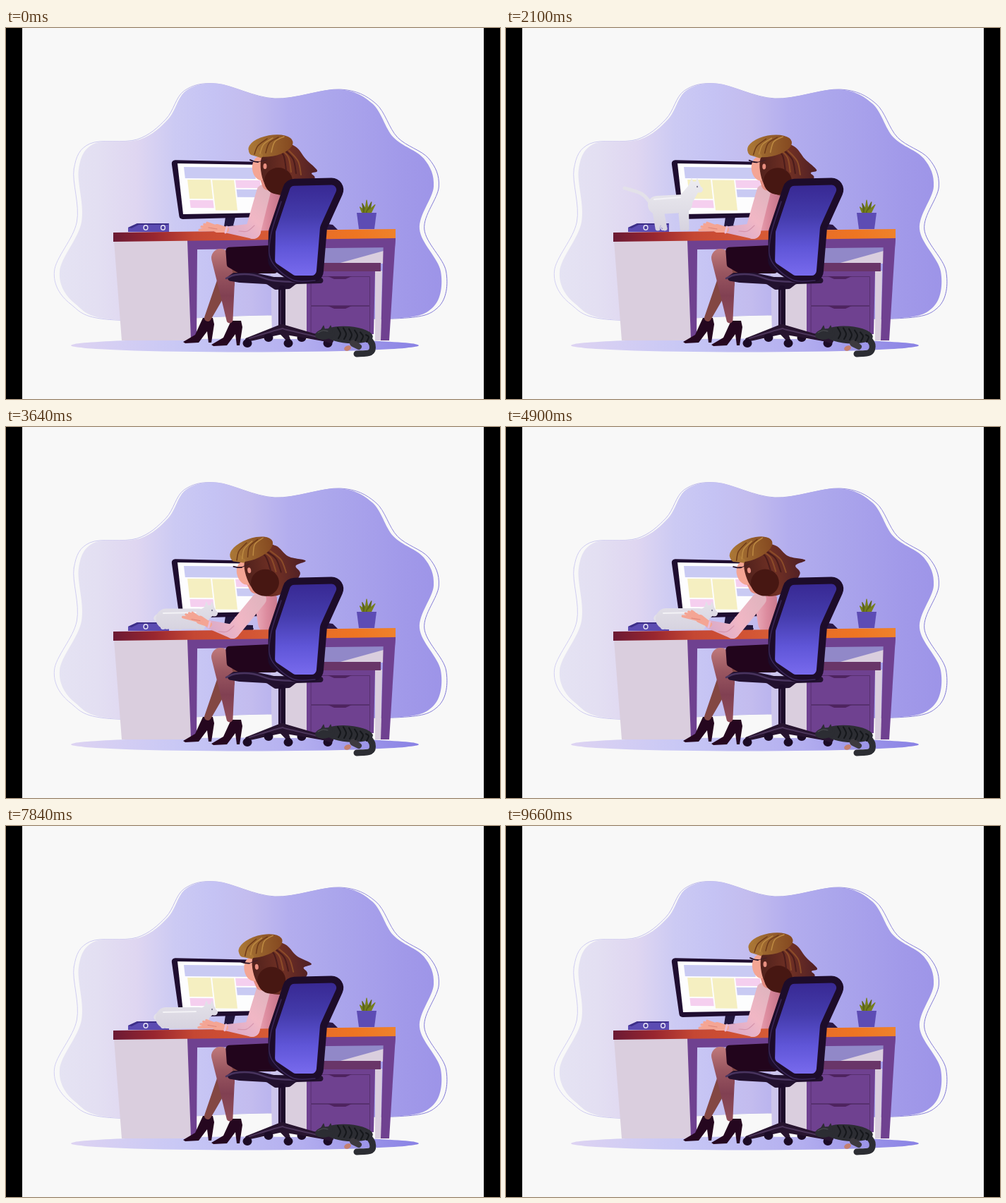
An HTML page with a canvas that plays this animation: 700x526 px, repeating every 9.8 s.

```html
<!DOCTYPE html>
<html lang="en">
<head>
<meta charset="utf-8">
<title>Desk with cats</title>
<style>
html, body { margin: 0; width: 100%; height: 100%; overflow: hidden; background: #000; }
canvas { display: block; }
</style>
</head>
<body>
<canvas id="stage" width="700" height="526"></canvas>
<script>
const c = document.getElementById('stage').getContext('2d');
const LOOP = 9800, STEP = 140, PI = Math.PI, TAU = PI * 2;
const DARK = '#1d0c2a', PURPLE = '#6f4190', PALE = '#dacede';
const SKIN = '#f4a594', SHOE = '#25071f', FUR = '#2c2d33', NAVY = '#21163c';

const lerp = (a, b, k) => a + (b - a) * k;
const between = (p, q, k) => [lerp(p[0], q[0], k), lerp(p[1], q[1], k)];
const ramp = (t, a, b) => {
  const k = Math.min(1, Math.max(0, (t - a) / (b - a)));
  return k * k * (3 - 2 * k);
};
const wave = (t, period) => Math.sin(TAU * t / period);
const pts = s => s.split(' ').map(p => p.split(',').map(Number));

function paint(fill) {
  c.fillStyle = fill;
  c.fill();
}
function ink(col, w) {
  c.strokeStyle = col;
  c.lineWidth = w;
  c.lineCap = c.lineJoin = 'round';
  c.stroke();
}
// Evenly spaced colour stops
function grad(x0, y0, x1, y1, ...cols) {
  const g = c.createLinearGradient(x0, y0, x1, y1);
  cols.forEach((col, i) => g.addColorStop(i / (cols.length - 1), col));
  return g;
}
function poly(s, fill) {
  c.beginPath();
  pts(s).forEach(p => c.lineTo(...p));
  c.closePath();
  paint(fill);
}
// Polygon with rounded corners
function rounded(s, r) {
  const p = pts(s), n = p.length;
  c.beginPath();
  c.moveTo(...between(p[n - 1], p[0], .5));
  p.forEach((q, i) => c.arcTo(...q, ...p[(i + 1) % n], r));
  c.closePath();
}
// Smooth path through every point
function spline(p, closed) {
  const n = p.length;
  const at = i => p[closed ? (i + n) % n : Math.min(n - 1, Math.max(0, i))];
  c.beginPath();
  c.moveTo(...p[0]);
  for (let i = 0; i < (closed ? n : n - 1); i++) {
    const [a, b, d, e] = [at(i - 1), at(i), at(i + 1), at(i + 2)];
    c.bezierCurveTo(b[0] + (d[0] - a[0]) / 6, b[1] + (d[1] - a[1]) / 6,
      d[0] - (e[0] - b[0]) / 6, d[1] - (e[1] - b[1]) / 6, ...d);
  }
}
function line(p, col, w) {
  spline(p, false);
  ink(col, w);
}
function oval(x, y, rx, ry, fill, turn = 0) {
  c.beginPath();
  c.ellipse(x, y, rx, ry, turn, 0, TAU);
  paint(fill);
}
// Tapered limb with round ends of radius r and s
function limb([x, y], [u, v], r, s, fill) {
  const a = Math.atan2(v - y, u - x) + PI / 2;
  c.beginPath();
  c.arc(x, y, r, a, a + PI);
  c.arc(u, v, s, a + PI, a + TAU);
  c.closePath();
  paint(fill);
}

const CLOUD = pts('103,200 125,164 190,158 230,129 255,89 300,79 380,100 470,87 519,107 549,155 592,185 606,225 586,285 616,345 605,396 545,412 370,407 160,414 98,391 76,345 107,275');

function backdrop() {
  c.fillStyle = '#000';
  c.fillRect(0, 0, 700, 526);
  c.fillStyle = '#f8f8f8';
  c.fillRect(23, 0, 654, 526);
  const cx = 345;
  spline(CLOUD.map(([x, y]) => [cx + (x - cx) * 1.028, y]), true);
  ink(grad(68, 0, 622, 0, '#d2cff2', '#b5b0e6', '#8078d6'), 1);
  spline(CLOUD, true);
  paint(grad(76, 0, 618, 0, '#e5e3f3', '#e3dff2', '#dfd6f1', '#cccaf3', '#c5c3f4', '#c3bcee', '#b3adee', '#aca7ec', '#a7a0eb', '#a199e9', '#9d94e8'));
  oval(338.5, 450, 246.5, 9.5, grad(92, 0, 585, 0, '#ddd3f2', '#c7c7f5', '#b3aeef', '#8981e4'));
}

function drawers() {
  poly('375,312 426,312 426,433 377,433', PALE);
  poly('375,312 396,312 396,433 377,433', '#ccc5ec');
  poly('448,310 536,310 536,334 448,334', '#9188c8');
  poly('470,334 535,316 535,334', PALE);
  poly('523,344 533,344 531,443 523,443', PALE);
  poly('426,344 523,344 521,434 426,434', PURPLE);
  poly('420,333 531,333 531,345 420,345', '#693568');
  for (const y of [352, 394]) {
    c.strokeStyle = '#57306f';
    c.lineWidth = 1;
    c.strokeRect(432.5, y + .5, 83, 41);
    poly(`456,${y} 490,${y} 481,${y + 4} 465,${y + 4}`, '#4e235f');
  }
  poly('535,300 552,298 543,443 531,443', PURPLE);
}

function monitor() {
  poly('311,268 325,268 322,280 350,281 350,288 308,288', NAVY);
  rounded('234,187 368,190 368,268 246,271', 5);
  paint('#1f0d30');
  poly('243,192 364,194 364,262 251,264', '#fdfdfe');
  c.save();
  c.transform(1, .01, .115, 1, 252, 197);
  const panel = (x, y, w, h, col) => {
    c.fillStyle = col;
    c.fillRect(x, y, w, h);
  };
  panel(0, 0, 100, 16, '#c9caf3');
  panel(3, 18, 33, 27, '#f5efc1');
  panel(38, 18, 31, 43, '#f5efc1');
  panel(3, 47, 33, 11, '#f5cfef');
  panel(71, 18, 35, 11, '#f5cfef');
  panel(71, 31, 35, 11, '#c9caf3');
  c.restore();
}

function binder() {
  poly('173,283 186,277 231,277 231,289 173,289', '#5b4bb2');
  poly('173,283 186,277 231,277 229,279 188,279 178,284', '#3d2f88');
  for (const x of [198, 222.5]) {
    oval(x, 283, 3.6, 4, '#e6e3f4');
    oval(x, 283, 2.2, 2.6, '#4b3c9f');
  }
}

function plant() {
  for (let i = -2; i <= 2; i++) {
    const a = i * .33 - PI / 2, len = 17 - 3 * Math.abs(i) + i;
    limb([511 + i * 2, 261], [511 + i * 2 + Math.cos(a) * len, 261 + Math.sin(a) * len], 3.2, .6, i % 2 ? '#5d6519' : '#767f1d');
  }
  poly('497,262 525,262 522,285 500,285', '#5d4cb4');
}

function desk() {
  poly('153,302 258,301 262,443 164,443', PALE);
  poly('257,301 552,297 551,311 271,314 270,443 262,443', PURPLE);
  poly('152,290 552,285 552,298 152,303',
    grad(152, 0, 552, 0, '#6b1a34', '#98262f', '#c54733', '#cf5034', '#d85d35', '#e66c2a', '#ee7522', '#ef822b'));
  poly('452,286 456,278 463,279 470,286', '#2a1743');
  poly('336,281 349,281 351,287 334,287', NAVY);
  plant();
}

function torso(k) {
  const skin = grad(350, 0, 390, 0, '#eeb1be', '#dc8b9e', '#c27288');
  limb([lerp(377, 368, k), lerp(236, 244, k)], [371, 278], 16, 14, skin);
}

function head(k, sway) {
  c.save();
  c.translate(372 - 18 * k, 222 + 6 * k);
  c.rotate(-.17 * k - sway);
  c.translate(-372, -222);
  limb([366, 206], [371, 222], 8, 8, '#e58d80');
  oval(361, 199, 12, 17, SKIN, -.12);
  // The loose end swings out as the head comes forward
  const tip = [441 + 7 * k, 202 - 6 * k];
  spline([[362, 184], [385, 161], [410, 168], [425, 186], tip, [433, 206 - 5 * k], [437, 214], [415, 234], [388, 237], [366, 220]], true);
  paint(grad(365, 0, 440, 0, '#54231d', '#703024', '#512025'));
  oval(386, 217, 20, 19, '#471712');
  for (let i = 0; i < 4; i++) {
    const x = 380 + 7 * i;
    line([[x, 168 + 2 * i], [x + 13, 180 + 3 * i], [x + 17, 202 + 2 * i]], i % 2 ? '#8c4c29' : '#4a1c1b', 2);
  }
  oval(375, 167, 32, 15, grad(343, 0, 406, 0, '#ad7a36', '#96602c', '#854920'), -.18);
  limb([351, 174], [361, 181], 7, 3, '#a87435');
  for (let i = 0; i < 4; i++) {
    const x = 352 + 8 * i;
    line([[x, 179 - i], [x + 5, 167 - 2 * i], [x + 18, 157 - i]], i % 2 ? '#bd8a42' : '#6e3a19', 1.5);
  }
  line([[346, 187], [351, 189], [357, 190]], '#251126', 1.8);
  line([[357, 190], [369, 187]], '#41202a', 1);
  oval(367, 196, 2.5, 4, '#e88f80');
  c.restore();
}

function shoe(dx, dy) {
  c.save();
  c.translate(dx, dy);
  poly('279,411 293,411 295,420 291,446 287,446 285,430 273,446 254,447 251,445 268,435', SHOE);
  c.restore();
}

function legs() {
  const tights = grad(0, 313, 0, 413, '#c07a7c', '#995660', '#814052', '#8f4d59');
  shoe(0, 0);
  limb([316, 345], [286, 411], 12, 5, '#834743');
  shoe(40, 4);
  limb([304, 326], [312, 362], 13, 12, tights);
  limb([312, 362], [317, 414], 12, 4.5, tights);
  rounded('311,311 374,308 387,348 330,348 313,338', 5);
  paint('#22051c');
}

function arm(k, pat) {
  const shoulder = between([365, 232], [359, 244], k);
  const elbow = between([350, 288], [321, 290], k);
  const wrist = between([312, 286], [288, 280], k);
  const palm = [wrist[0] - 13, wrist[1] - lerp(2, 8, k) + pat * .4];
  const cloth = grad(...wrist, ...shoulder, '#dbabc9', '#f1b7c5', '#e2b4bf');
  limb(shoulder, elbow, 10, lerp(11, 10, k), cloth);
  limb(elbow, wrist, lerp(11, 10, k), lerp(4.5, 6, k), cloth);
  line([[elbow[0] + 2, elbow[1] - 8], [elbow[0] - 8, elbow[1]], [elbow[0] - 20, elbow[1]]], '#d595ad', 1.2);

  limb(wrist, palm, 4, 6, SKIN);
  for (let i = 0; i < 4; i++) {
    const a = PI - .1 + .2 * i + k * .25 + pat * .02, len = 25 - 3 * i;
    limb(palm, [palm[0] + Math.cos(a) * len, palm[1] + Math.sin(a) * len + pat * .4], 4, 1.7, SKIN);
  }
  line([[palm[0] - 12, palm[1] - 1], [palm[0], palm[1] + 1]], '#dc8278', 1);
  line([[wrist[0] + 1, wrist[1] - 4], [wrist[0] - 1, wrist[1] + 4]], '#e8bdd8', 3);
}

function chair() {
  rounded('308,357 322,347 352,347 380,353 450,354 449,362 411,363 402,370 381,371 369,363 331,361', 4);
  paint('#22112f');
  line([[312, 355], [325, 350], [350, 350], [378, 358], [410, 360]], '#49345f', 2.5);
  limb([391, 370], [391, 424], 5, 5, DARK);
  line([[389, 372], [389, 420]], '#432f55', 1.5);
  for (const x of [342, 372, 400, 419, 456]) {
    const y = 447 - 8 * (x === 372 || x === 419);
    limb([391, 427], [x, y - 5], 7, 3, '#27142f');
    oval(x, y, 6.5, 6, '#1b0b25');
  }
  limb([440, 437], [460, 443], 4, 4, '#27142f');
  line([[345, 440], [388, 427], [398, 428], [450, 440]], '#4b3459', 2);

  rounded('400,219 480,217 450,283 444,356 407,356 376,335 377,288', 12);
  paint(grad(0, 223, 0, 354, '#382993', '#443bab', '#5f55d7', '#7a6cef'));
  ink(DARK, 10);
  line([[390, 246], [375, 295], [376, 330], [406, 357], [438, 358]], '#3a2758', 1.5);
}

function whiteCat(lie, breath) {
  const fur = grad(0, 215, 0, 289, '#ecebf0', '#e2e0e8', '#d6d2df');
  const hip = between([214, 251], [227, 272], lie);
  const chest = between([251, 249], [273, 272], lie);
  const [hx, hy] = between([267, 226], [288, 261], lie);
  const r = lerp(13, 15, lie) + breath;
  line([between([204, 247], [218, 266], lie), between([192, 235], [212, 272], lie), between([168, 227], [228, 284], lie)], '#e3e1e9', 5);
  for (const [from, foot] of [[hip, 215], [hip, 225], [chest, 250], [chest, 256]]) {
    limb(from, [lerp(foot, foot + 22, lie), 284], 8, 3.5, fur);
  }
  limb(hip, chest, r, r, fur);
  limb(chest, [hx, hy], 11, 8, fur);
  oval(hx, hy, 9, 8.5, fur);
  oval(hx + 7, hy + 3, 5, 4.5, fur);
  for (const x of [hx - 4, hx + 4]) {
    limb([x, hy - 4], [x, hy - 13], 3.5, .5, fur);
  }
  line([[hip[0] - 4, hip[1] - 8], [chest[0] - 4, chest[1] - 9]], '#f3f2f6', 2);
  oval(hx + 4, hy - 1, 1, 1.2, '#77728b');
}

// Jump arc from behind the desk (u = 0) to its top (u = 1)
function placeCat(u, lie, breath) {
  c.save();
  c.translate(-22 * (1 - u), 120 * (1 - u) - 150 * Math.sin(PI * u) * u);
  whiteCat(lie, breath);
  c.restore();
}

function sleepingCat(t) {
  const wag = wave(t, 2450) * 1.2, rise = wave(t, 1960) * .5;
  line([[511, 437], [519, 449], [516 + wag, 460], [497, 462]], FUR, 9);
  oval(485, 435, 35, 12 + rise, FUR, .08);
  oval(452, 434, 14, 7.5, FUR, -.15);
  for (const x of [449, 459]) limb([x, 430], [x + 1, 422], 4, .5, FUR);
  oval(484, 454, 5, 3.5, '#c5806f', -.4);
  limb([492, 447], [500, 452], 5, 4, '#3d3a3f');
  for (let i = 0; i < 6; i++) {
    const x = 470 + i * 8;
    line([[x, 425 + i * i * .4], [x + 4, 433 + i], [x + 1, 440 + i]], '#15171b', 2);
  }
  line([[442, 432], [449, 429], [456, 430]], '#494b50', 1.2);
}

function draw(t) {
  const lean = ramp(t, 1900, 3300) - ramp(t, 7300, 8400);
  const reach = ramp(t, 2200, 3360) - ramp(t, 6900, 7980);
  const lie = ramp(t, 2240, 3080) - ramp(t, 8120, 8680);
  const u = ramp(t, 1120, 1820) - ramp(t, 8680, 9380);
  const behind = u < .55;
  const breath = wave(t, 1960) * .5 * lie;
  const pat = 4 * Math.cos(TAU * (t - 3640) / 1680) * reach;

  backdrop();
  drawers();
  monitor();
  if (u > 0 && behind) placeCat(u, lie, breath);
  torso(lean);
  desk();
  binder();
  legs();
  if (!behind) placeCat(u, lie, breath);
  arm(reach, pat);
  head(lean, .015 * lean * wave(t - 3640, 3360));
  chair();
  sleepingCat(t);
}

function tick() {
  const t = performance.now() % LOOP;
  draw(Math.floor(t / STEP) * STEP);
  requestAnimationFrame(tick);
}
tick();
</script>
</body>
</html>
```
